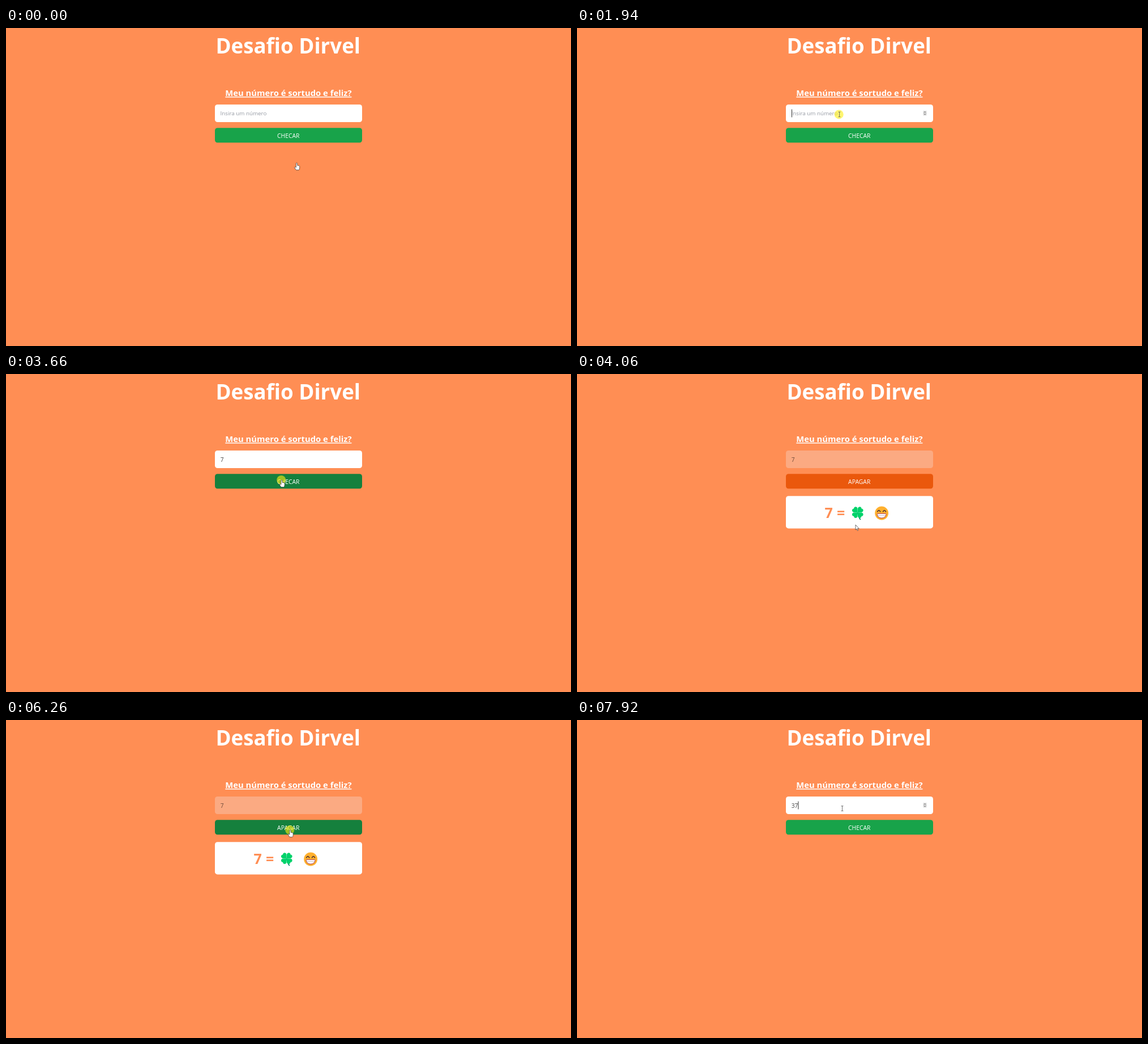
An HTML page for the animation above (7.99 s loop, 998 px wide and 561 px high).

```html
<!DOCTYPE html>
<html lang="pt-BR">
<head>
<meta charset="utf-8">
<title>Desafio</title>
<style>
  html, body { margin: 0; width: 100%; height: 100%; overflow: hidden; background: #ff8e54; }
  svg { display: block; width: 998px; height: 561px; }
  text { font-family: "Open Sans", "Noto Sans", sans-serif; fill: #fff; }
  .bold { font-weight: 700; }
  .hint { font-size: 9.8px; fill: #959aa3; }
  .sum { font-size: 25px; fill: #ff8e54; }
</style>
</head>
<body>
<svg viewBox="0 0 998 561">
  <text class="bold" x="370.4" y="45" font-size="36.7">Desafio Dirvel</text>
  <text class="bold" x="498.9" y="120" font-size="14.8" text-anchor="middle" text-decoration="underline">Meu número é sortudo e feliz?</text>

  <rect id="field" x="369" y="135" width="260" height="31" rx="4.5"/>
  <text id="hint" class="hint" x="378.6" y="154.4">Insira um número</text>
  <text id="value" x="378.8" y="154.6" font-size="10.2"></text>
  <rect id="caret" y="143.5" width="1" height="14" fill="#333"/>
  <g id="spinner">
    <rect x="611.5" y="146" width="6" height="8.4" fill="#dcdcdc"/>
    <path d="M612.9 149.3L614.5 147.7L616.1 149.3M612.9 151.3L614.5 152.9L616.1 151.3" fill="none" stroke="#555" stroke-width=".9"/>
  </g>

  <rect id="button" x="369" y="176.3" width="260" height="26" rx="4.5"/>
  <text id="label" x="498.7" y="193.7" font-size="10.4" text-anchor="middle"></text>

  <g id="card">
    <rect x="369" y="215.2" width="260" height="57.2" rx="4.5" fill="#fff"/>
    <text class="bold sum" x="437.5" y="254">7</text>
    <text class="bold sum" x="459" y="254">=</text>
    <g transform="translate(495.8 244.2)">
      <path d="M0 1Q1 8 4.6 12.2" fill="none" stroke="#008463" stroke-width="1.7" stroke-linecap="round"/>
      <g id="leaves" fill="#00d26a"></g>
    </g>
    <g transform="translate(538.1 245.5)">
      <circle r="11.9" fill="#ffb02e"/>
      <path d="M-7.4 -2.6Q-4.9 -7.2-2.4 -2.6M2.4 -2.6Q4.9 -7.2 7.4 -2.6" fill="none" stroke="#402a32" stroke-width="1.5" stroke-linecap="round"/>
      <path d="M-7.2 .8H7.2Q8 .8 8 1.8Q7 8.6 0 8.6T-8 1.8Q-8 .8-7.2 .8Z" fill="#fff" stroke="#b03a4c" stroke-width="1"/>
      <path d="M-7 4.3H7" stroke="#b9a9b0" stroke-width=".8"/>
    </g>
  </g>

  <circle id="press" r="8" fill="#ffee12" fill-opacity=".6"/>
  <g id="cursor">
    <path id="arrow" d="M0 0V9L2 7.2L3.3 10.3L4.7 9.7L3.4 6.7H6.2Z" fill="#fff" stroke="#333" stroke-width=".7"/>
    <path id="hand" d="M-1.1 1.1Q-1.1 0 0 0T1.1 1.1V4.3Q5 4.4 5.2 6V9Q5 11.6 3.8 12.5H-1Q-3 10-4 7.6Q-3.4 6.2-1.1 8Z" fill="#fff" stroke="#333" stroke-width=".7"/>
    <path id="beam" d="M-2 -4.3H2M0 -4.3V4.3M-2 4.3H2" fill="none" stroke="#555" stroke-width=".8"/>
  </g>
</svg>
<script>
const LOOP = 7990, PRESS = 130, BLINK = 530, FADE = 150;
const GREEN = [24, 163, 74], DARK = [21, 128, 61], ORANGE = [234, 88, 12];
const $ = id => document.getElementById(id);

// Pointer glides: start, end, destination
const home = [513.5, 238];
const glides = [
  [460, 1200, 463.5, 152.4],
  [3070, 3460, 487, 187],
  [3790, 4060, 492, 266],
  [5060, 5590, 502, 194],
  [6390, 6690, 468.5, 156]
];
const fieldClicks = [1940, 6790], buttonClicks = [3660, 6260];
const keys = [[2930, "7"], [7720, "3"], [7920, "7"]];

const [checked, cleared] = buttonClicks.map(t => t + PRESS);
const clicks = [...fieldClicks, ...buttonClicks];
const edits = [...fieldClicks, ...keys.map(k => k[0])];

const easeOut = u => 1 - (1 - u) ** 2;
const recent = (times, span, t) => times.some(k => t >= k && t < k + span);
const show = (id, on) => $(id).setAttribute("visibility", on ? "visible" : "hidden");
const place = (id, x, y) => $(id).setAttribute("transform", `translate(${x} ${y})`);

const isDone = t => t >= checked && t < cleared;
const overField = y => y > 135 && y < 166;
const overButton = y => y > 176 && y < 202;

function pointer(t) {
  let [x, y] = home;
  for (const [start, end, toX, toY] of glides) {
    const s = easeOut(Math.min(Math.max((t - start) / (end - start), 0), 1));
    x += (toX - x) * s;
    y += (toY - y) * s;
  }
  return [x, y];
}

const goalColor = t => overButton(pointer(t)[1]) ? DARK : isDone(t) ? ORANGE : GREEN;

// Eased fade: weighted mean of the goal colours over the last FADE ms
function buttonColor(t) {
  const n = 15, sum = [0, 0, 0];
  for (let k = 0; k < n; k++)
    goalColor(t - k * FADE / n).forEach((c, i) => sum[i] += c * (n - k));
  return `rgb(${sum.map(c => Math.round(c * 2 / (n * (n + 1))))})`;
}

function typedText(t) {
  const since = t < cleared ? 0 : cleared;
  return keys.filter(k => k[0] >= since && k[0] <= t).map(k => k[1]).join("");
}

function draw(t) {
  const [x, y] = pointer(t);
  const done = isDone(t), text = typedText(t);
  const onField = overField(y) && !done;
  const onButton = t < 70 || overButton(y);

  $("field").setAttribute("fill", done ? "#fbaa82" : "#fff");
  $("value").textContent = text;
  $("value").style.fill = done ? "#6d4838" : "#444";
  $("caret").setAttribute("x", 379 + 5.7 * text.length);
  $("button").setAttribute("fill", buttonColor(t));
  $("label").textContent = done ? "APAGAR" : "CHECAR";
  show("hint", !text);
  show("caret", recent(edits, BLINK, t));
  show("spinner", onField);
  show("card", done);

  show("press", recent(clicks, PRESS, t));
  show("hand", onButton);
  show("beam", onField);
  show("arrow", !onButton && !onField);
  place("press", x - .8, y);
  place("cursor", x, y);
}

$("leaves").innerHTML = [0, 1, 2, 3].map(i =>
  `<path transform="rotate(${45 + 90 * i})" d="M0 0L-4.8 -5.2C-7 -8.6-2.6 -12.4 0 -9.4C2.6 -12.4 7 -8.6 4.8 -5.2Z"/>`).join("");

const begin = performance.now();
function frame() {
  draw((performance.now() - begin) % LOOP);
  requestAnimationFrame(frame);
}
frame();
</script>
</body>
</html>
```
